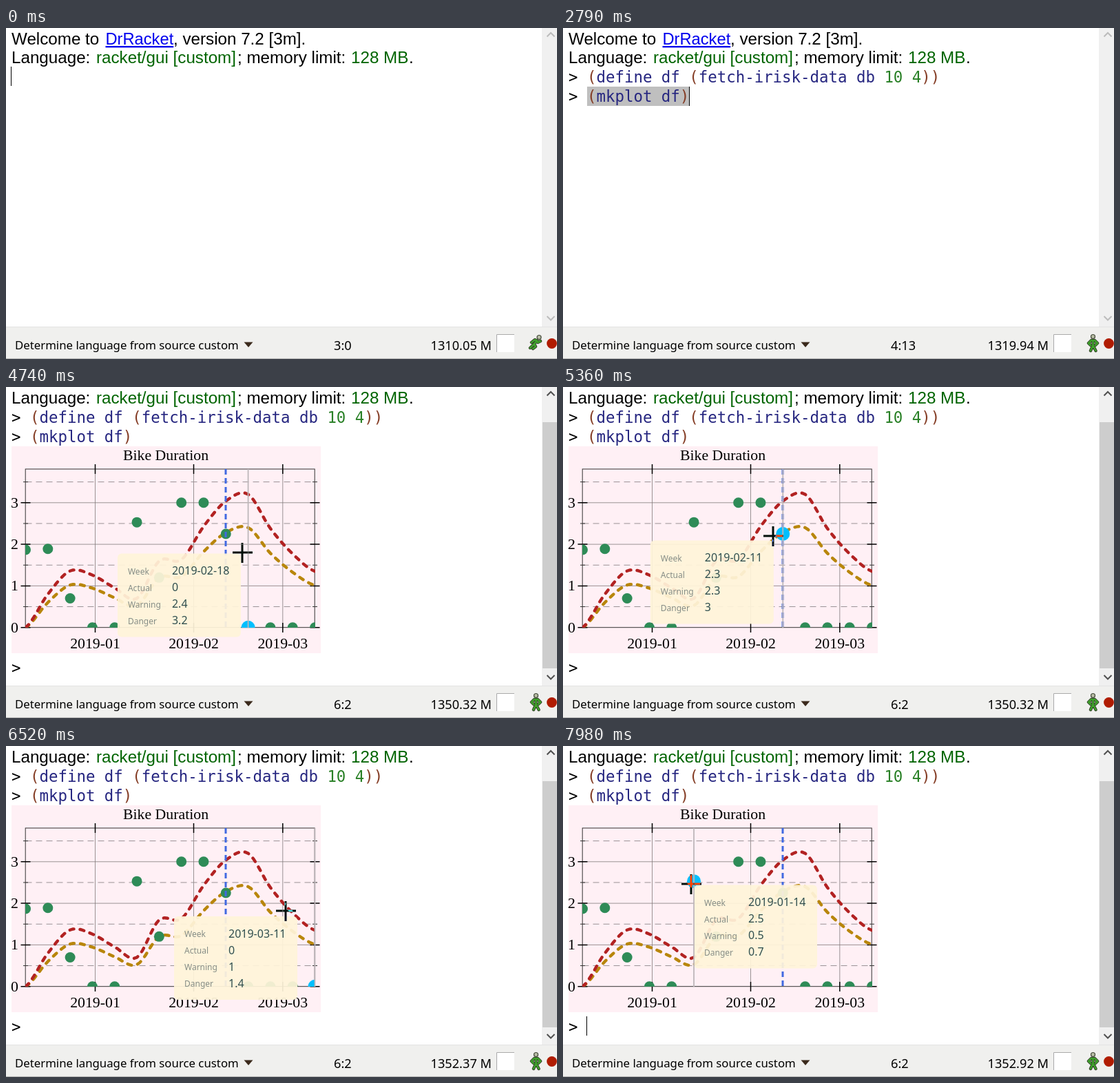
Recreate the animation shown at these times as an HTML page. Size 800 by 480 pixels, loop 8 s.

```html
<!DOCTYPE html>
<html lang="en">
<head>
<meta charset="utf-8">
<title>Console plot session</title>
<style>
html, body { margin: 0; width: 100%; height: 100%; overflow: hidden; background: #fff; }
svg { display: block; width: 800px; height: 480px; isolation: isolate; }
text { white-space: pre; }
.sans { font: 24.2px "Liberation Sans", Arial, sans-serif; }
.mono { font: 22.4px "DejaVu Sans Mono", monospace; }
.serif { font: 21.8px "Liberation Serif", "Times New Roman", serif; }
.ui { font: 16.8px "Noto Sans", "Open Sans", sans-serif; }
.num { font-size: 18.2px; }
.key { font-size: 12px; fill: #858d86; }
.value { font-size: 16px; fill: #2f4f4f; }
.green { fill: #006400; }
.link { font-size: 23.7px; fill: #0000ee; text-decoration: underline 1.5px; text-decoration-skip-ink: none; }
#pointer { fill: none; stroke: #fff; mix-blend-mode: difference; }
</style>
</head>
<body>
<svg viewBox="0 0 800 480">
  <rect width="800" height="480" fill="#fff"/>
  <g id="console">
    <g id="welcome" class="sans">
      <text x="8" y="24">Welcome to</text>
      <text x="144.5" y="24" class="link">DrRacket</text>
      <text x="243" y="24">, version 7.2 [3m].</text>
    </g>
    <g class="sans">
      <text x="8" y="51">Language:</text>
      <text x="131" y="51" class="green">racket/gui [custom]</text>
      <text x="336" y="51">; memory limit:</text>
      <text x="501" y="51" class="green">128 MB</text>
      <text x="585" y="51">.</text>
    </g>
    <rect id="selection" x="35" height="28" fill="#bfbfbf"/>
    <g class="mono">
      <text id="prompt1" x="8" y="79">&gt;</text>
      <text id="input1" x="35" y="79"></text>
      <text id="prompt2" x="8" y="107">&gt;</text>
      <text id="input2" x="35" y="107"></text>
      <text id="prompt3" x="8" y="442">&gt;</text>
    </g>
    <rect id="caret" width="1" height="28"/>
  </g>
  <g id="plot"></g>
  <rect x="778" width="22" height="434" fill="#f0f0f0"/>
  <rect id="thumb" x="779" y="51" width="21" height="357" fill="#cdcdcd"/>
  <path id="arrows" d="M785.5 12.5l5.5-5.5 5.5 5.5M785.5 418l5.5 5.5 5.5-5.5" fill="none" stroke-width="2"/>
  <rect y="433" width="800" height="47" fill="#f0f0ee"/>
  <path d="M0 433.5H800" stroke="#e3e3e3"/>
  <path d="M0 479.5H800" stroke="#b4b4b4"/>
  <g class="ui">
    <text x="13" y="466">Determine language from source custom</text>
    <text id="position" class="num" x="476" y="467"></text>
    <text id="memory" class="num" x="616.5" y="467"></text>
  </g>
  <path d="M345.5 455.5h13l-6.5 7.5z" fill="#3b2a1c"/>
  <rect x="712" y="444" width="26" height="26" fill="#fff"/>
  <path d="M712.5 470V444.5H738" fill="none" stroke="#aaa"/>
  <g id="runner" fill="none" stroke-linecap="round" stroke-linejoin="round">
    <path class="limbs" stroke="#343d2a" stroke-width="4.4"/>
    <path class="limbs" stroke="#3fa02c" stroke-width="2.6"/>
    <circle id="head" r="3" fill="#b9bea6" stroke="#454b3c" stroke-width="1.2"/>
  </g>
  <circle cx="792.5" cy="457.5" r="7.4" fill="#b01c02"/>
  <path id="pointer"/>
</svg>
<script>
const LOOP = 8000;
const $ = id => document.getElementById(id);
const show = (el, on) => el.setAttribute("display", on ? "inline" : "none");
const set = (el, attrs) => { for (const k in attrs) el.setAttribute(k, attrs[k]); };

// Console session: each entry changes the state from its time on.
const DEFINE = "(define df (fetch-irisk-data db 10 4))";
const MKPLOT = "(mkplot df)";
const CHAR = 13.48;
const endOf = text => Math.round(34.3 + CHAR * text.length);
const session = [
  [0, { caret: [7, 56], pos: "3:0", mem: "1310.05", prompts: 0, in1: "", in2: "", sel: 0, scrolled: false }],
  [70, { caret: null }],
  [560, { caret: [7, 56] }],
  [870, { caret: [34, 56], pos: "3:2", prompts: 1 }],
  [950, { mem: "1319.79" }],
  [1120, { caret: null }],
  [1580, { in1: MKPLOT, sel: 1, pos: "3:13", caret: [endOf(MKPLOT), 56] }],
  [1650, { in1: DEFINE, pos: "3:40", caret: [endOf(DEFINE), 56] }],
  [1800, { mem: "1319.94" }],
  [1950, { sel: 0, pos: "4:0", caret: [7, 85] }],
  [2100, { prompts: 2, pos: "4:2", caret: [34, 85] }],
  [2420, { caret: null }],
  [2720, { in2: DEFINE, sel: 2, pos: "4:40", caret: [endOf(DEFINE), 85] }],
  [2790, { in2: MKPLOT, pos: "4:13", caret: [endOf(MKPLOT), 85] }],
  [3110, { mem: "1322.58" }],
  [3280, { sel: 0, caret: null }],
  [3510, { scrolled: true, pos: "5:0", mem: "1350.32" }],
  [3660, { prompts: 3, pos: "6:2" }],
  [5610, { mem: "1352.37" }],
  [7980, { mem: "1352.92" }]
];
const stateAt = t => Object.assign({}, ...session.filter(s => s[0] <= t).map(s => s[1]));

const colourCode = text => text.replace(/[()]+|\b\d+\b|[^()\d]+/g, part => {
  const fill = /[()]/.test(part) ? "#843c24" : /^\d/.test(part) ? "#298026" : "#262680";
  return `<tspan fill="${fill}">${part}</tspan>`;
});

// Plot data, one value per week.
const actual = [1.87, 1.89, 0.7, 0, 0, 2.53, 1.2, 3, 3, 2.25, 0, 0, 0, 0];
const danger = [0, 0.8, 1.36, 1.26, 0.95, 0.7, 1.6, 1.63, 2.43, 3.04, 3.2, 2.38, 1.77, 1.35];
const warning = danger.map(v => v * 0.75);
const LEFT = 28.5, RIGHT = 448.5, TOP = 119, BOTTOM = 348.7;
const weekX = k => LEFT + k * (RIGHT - LEFT) / 13;
const valueY = v => BOTTOM - v * 60.3;

function curve(values) {
  const slope = i => ((values[i + 1] ?? values[i]) - (values[i - 1] ?? values[i])) / 2;
  let d = "";
  for (let i = 0; i < 13; i++)
    for (let s = 0; s < 1; s += 0.125) {
      const a = values[i], b = values[i + 1], u = 1 - s;
      const v = a * u * u * (1 + 2 * s) + b * s * s * (3 - 2 * s) + slope(i) * s * u * u - slope(i + 1) * s * s * u;
      d += `${d ? "L" : "M"}${weekX(i + s).toFixed(1)} ${valueY(v).toFixed(1)}`;
    }
  return d + `L${RIGHT} ${valueY(values[13])}`;
}

function buildPlot() {
  const months = [["2019-01", 129.5], ["2019-02", 272.5], ["2019-03", 401.8]];
  let grid = "", minor = "", ticks = "", minorTicks = "", labels = "";
  for (const [name, x] of months) {
    grid += `M${x} ${TOP}V${BOTTOM}`;
    ticks += `M${x} 112v14M${x} 342v14`;
    labels += `<text x="${x}" y="379" text-anchor="middle">${name}</text>`;
  }
  for (let v = 0; v < 4; v += 0.5) {
    const y = valueY(v);
    const tickPair = half => `M${LEFT - half} ${y}h${2 * half}M${RIGHT - half} ${y}h${2 * half}`;
    if (v % 1 === 0) {
      if (v) grid += `M${LEFT} ${y}H${RIGHT}`;
      ticks += tickPair(7);
      labels += `<text x="18" y="${y + 7}" text-anchor="end">${v}</text>`;
    } else {
      minor += `M${LEFT} ${y}H${RIGHT}`;
      minorTicks += tickPair(3.5);
    }
  }
  const line = (values, colour) => `<path d="${curve(values)}" stroke="${colour}" stroke-width="4.4"
    stroke-linecap="round" stroke-dasharray="6 9"/>`;
  const dots = actual.map((v, k) => `<circle cx="${weekX(k)}" cy="${valueY(v)}" r="7.5"/>`).join("");
  const rows = ["Week", "Actual", "Warning", "Danger"].map((name, i) =>
    `<text class="key" x="15" y="${30 + 24 * i}">${name}</text>
     <text class="value" x="79" y="${30.5 + 24 * i}"></text>`).join("");
  $("plot").innerHTML = `
    <clipPath id="area"><rect x="28" y="${TOP}" width="421" height="230"/></clipPath>
    <rect x="8" y="86" width="449" height="300" fill="#fff0f5"/>
    <g fill="none">
      <path d="${grid}" stroke="#807a7c" stroke-width="0.8"/>
      <path d="${minor}" stroke="#999195" stroke-dasharray="9 6"/>
      <rect x="${LEFT - 0.3}" y="${TOP}" width="420" height="${BOTTOM - TOP}" stroke="#333"/>
      <path d="${minorTicks}" stroke="#333"/>
      <path d="${ticks}" stroke="#000" stroke-width="1.5"/>
    </g>
    <g class="serif"><text x="232" y="106" text-anchor="middle">Bike Duration</text>${labels}</g>
    <g clip-path="url(#area)">
      <g fill="none">${line(warning, "#b8860b")}${line(danger, "#b22222")}</g>
      <g fill="#2e8b57">${dots}</g>
      <path d="M319 ${TOP}V349" stroke="#4169e1" stroke-width="3" stroke-dasharray="8 5"/>
    </g>
    <g id="hover">
      <circle id="spot" r="10" fill="#00bfff" clip-path="url(#area)"/>
      <g id="tip" class="ui">
        <rect width="179" height="121" rx="6" fill="#fff5da" fill-opacity="0.93"/>${rows}
      </g>
      <path id="rule" stroke="#bdb7ba" stroke-width="1.8"/>
    </g>`;
}

// Pointer route: time, x, y.
const route = [
  [3980, 600, 58], [4056, 548, 157], [4290, 450, 235], [4500, 395, 247], [4660, 344, 240],
  [4740, 343, 240], [5200, 312, 226], [5700, 290, 192], [5870, 287, 186], [5960, 287, 186],
  [6300, 418, 240], [6440, 428, 247], [6868, 228, 175], [6944, 219, 177], [7550, 186, 200]
];
const STEP = 76;
function pointerAt(t) {
  const next = route.findIndex(p => p[0] > t);
  if (next === 0) return route[0].slice(1);
  if (next < 0) return route[route.length - 1].slice(1);
  const [a, b] = [route[next - 1], route[next]];
  const s = (t - a[0]) / (b[0] - a[0]);
  return [1, 2].map(i => a[i] + (b[i] - a[i]) * s);
}

function drawHover(t) {
  const [x, y] = pointerAt(t);
  const inside = x > LEFT && x < RIGHT && y > TOP && y < BOTTOM;
  show($("hover"), t >= route[0][0] && inside);
  if (!inside) return;
  const week = Math.min(13, Math.ceil((x - LEFT - 1) / (weekX(1) - LEFT)));
  const date = new Date(Date.UTC(2018, 11, 10 + 7 * week)).toISOString().slice(0, 10);
  const texts = [date, ...[actual, warning, danger].map(list => String(+list[week].toFixed(1)))];
  document.querySelectorAll("#tip .value").forEach((el, i) => { el.textContent = texts[i]; });
  set($("spot"), { cx: weekX(week), cy: valueY(actual[week]) });
  set($("rule"), { d: `M${weekX(week)} ${TOP}V349` });
  const tipX = x + 4 + 179 > 457 ? x - 182 : x + 4;
  set($("tip"), { transform: `translate(${tipX} ${y + 1.5})` });
}

function drawPointer(t) {
  show($("pointer"), t >= route[0][0]);
  if (t < route[0][0]) return;
  const now = route[0][0] + Math.floor((t - route[0][0]) / STEP) * STEP;
  const [x, y] = pointerAt(now).map(Math.round);
  const overPlot = x > 8 && x < 457 && y > 86 && y < 386;
  set($("pointer"), {
    d: overPlot ? `M${x - 14} ${y}h29M${x} ${y - 14}v29`
      : `M${x - 7} ${y - 12}h5l2 1l2-1h5M${x - 7} ${y + 12}h5l2-1l2 1h5M${x} ${y - 11}v22`,
    "stroke-width": overPlot ? 3 : 2
  });
  drawHover(now - STEP);
}

const poses = [
  { head: [774, 448.5], limbs: "M771 453L767 458L769 462L765 465M767 458L761 464M763 456L768 452L772 456L776 454" },
  { head: [771.5, 448], limbs: "M770 453L768 459L763 462M768 459L773 465M764 458L768 453L775 456" },
  { head: [772, 448.5], limbs: "M771 453L767 459L769 466M767 459L762 465M765 452L770 453L774 459" }
];
const standing = { head: [769.5, 447.5], limbs: "M766 460L763 457L767 453H772L776 457L773 460M769.5 454V460L766 468M769.5 460L773.5 468" };
const strides = [70, 320, 400, 480, 560, 710, 790, 870];

function drawRunner(t) {
  const pose = t >= 950 ? standing : poses[strides.filter(s => s <= t).length % 3];
  document.querySelectorAll(".limbs").forEach(el => set(el, { d: pose.limbs }));
  set($("head"), { cx: pose.head[0], cy: pose.head[1] });
}

function render(t) {
  const s = stateAt(t);
  set($("console"), { transform: `translate(0 ${s.scrolled ? -27 : 0})` });
  show($("welcome"), !s.scrolled);
  for (const n of [1, 2, 3]) show($("prompt" + n), s.prompts >= n);
  for (const n of [1, 2]) $("input" + n).innerHTML = colourCode(s["in" + n]);
  show($("selection"), s.sel);
  if (s.sel) set($("selection"), { y: s.sel === 1 ? 57 : 85, width: CHAR * s["in" + s.sel].length });

  const blinkOn = t >= 3830 && Math.floor((t - 3830) / 490) % 2 === 0;
  const caret = blinkOn ? [34, 419] : s.caret;
  show($("caret"), caret);
  if (caret) set($("caret"), { x: caret[0], y: caret[1] });

  show($("plot"), s.scrolled);
  show($("thumb"), s.scrolled);
  set($("arrows"), { stroke: s.scrolled ? "#505050" : "#bcbcbc" });
  $("position").textContent = s.pos;
  $("memory").textContent = s.mem + " M";
  show($("hover"), false);
  drawPointer(t);
  drawRunner(t);
}

buildPlot();
const start = performance.now();
function tick(now) {
  render(Math.max(0, now - start) % LOOP);
  requestAnimationFrame(tick);
}
render(0);
requestAnimationFrame(tick);
</script>
</body>
</html>
```
